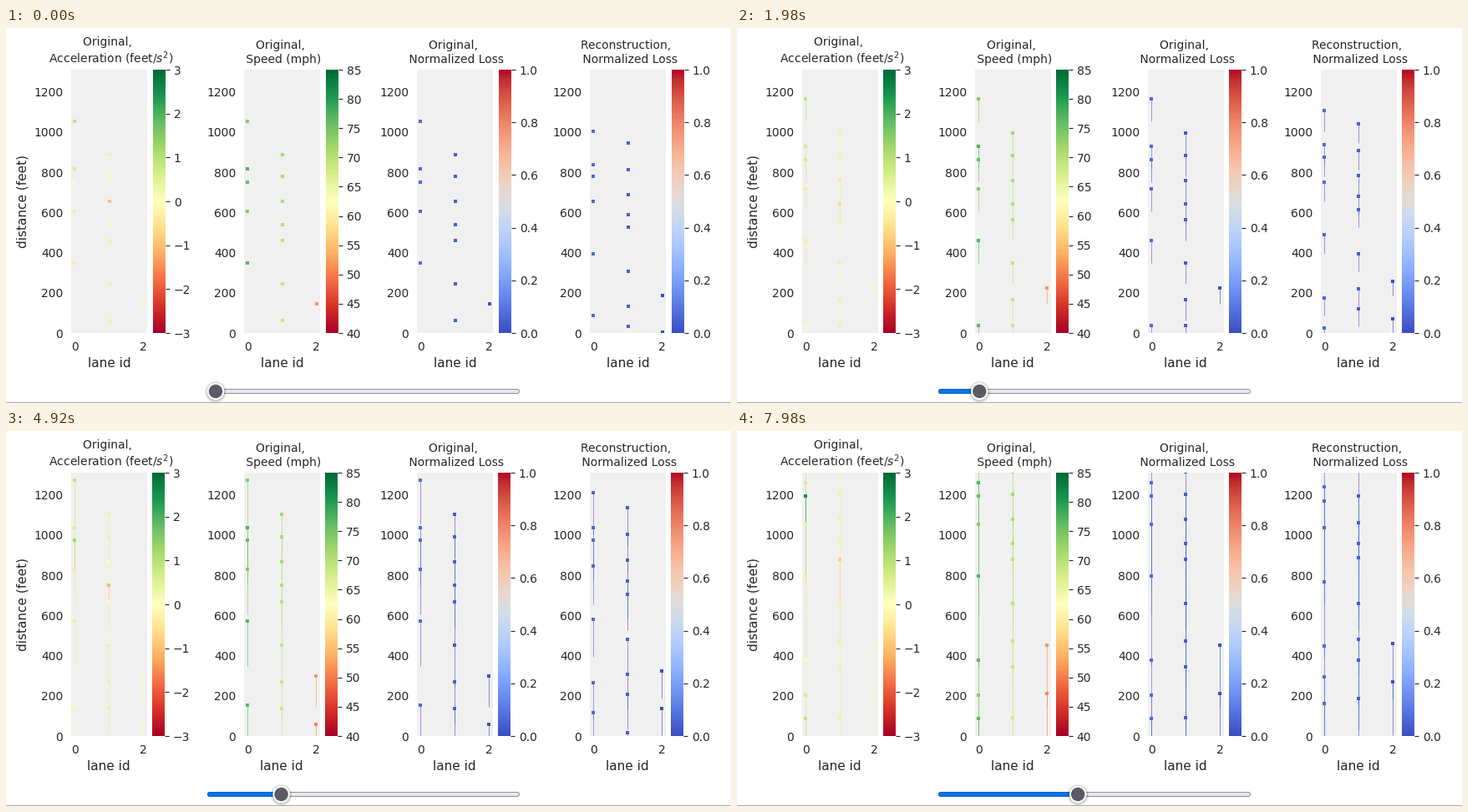
These frames come from a looping animation (868 px wide and 450 px high, 8000 ms). A matplotlib script:

```python
import numpy as np
import matplotlib.pyplot as plt
from matplotlib.animation import FuncAnimation
from matplotlib.cm import ScalarMappable
from matplotlib.collections import LineCollection
from matplotlib.colors import Normalize
from matplotlib.patches import Circle, FancyBboxPatch, Rectangle

W, H, DPI = 868, 450, 100
INTERVAL, FRAMES, HOLD = 320, 25, 6     # slider advances every HOLD frames
PX = 72 / DPI                           # one pixel in points
TOP, TALL, PITCH = 50, 316, 207         # panel top, height, spacing
INK = "#262626"

plt.rcParams.update({
    "font.family": "DejaVu Sans", "font.size": 10, "axes.titlesize": 10,
    "axes.labelsize": 11, "text.color": INK, "axes.labelcolor": INK,
    "xtick.color": INK, "ytick.color": INK})

# Per lane: start distances in feet, feet per step, change of pace per car
TRAFFIC = [
    ([1053, 817, 751, 606, 348, -73, -249, -365], 110.3, .4),
    ([888, 778, 655, 539, 460, 245, 62, -67, -315], 107, -.65),
    ([145, -95], 77, 0),
]
REBUILT = [
    ([1004, 838, 778, 655, 394, 85, -62, -185], 102.5, -2.3),
    ([944, 813, 689, 589, 525, 305, 133, 35, -149], 96.5, -1.6),
    ([187, 6], 68, -2.5),
]


def bump(x, width):
    return np.exp(-(x / width) ** 2)


def accel(lane, car, step):
    if lane == 0:       # one car speeds up among steady ones
        return .2 + .7 * np.cos(.9 * car) + .6 * step * bump(car - 2, .4)
    if lane == 1:       # a braking wave passes back through the lane
        return .35 - 1.4 * bump(car - 2.2 - .37 * step, .8)
    return .1 + 0 * car


def speed(lane, car, step):
    return (75.5 + 2 * np.sin(2 * car - 1), 71.5 - .45 * car, 52 - car)[lane]


def loss(lane, car, step):
    return .07 - .03 * lane + 0 * car


class Panel:
    def __init__(self, n, title, lanes, value, cmap, low, high, tick):
        self.left, self.lanes, self.value = 78 + PITCH * n, lanes, value
        self.map = ScalarMappable(Normalize(low, high), cmap)
        self.ax, self.bar = fig.add_axes([0, 0, 1, 1]), fig.add_axes([0, 0, .5, 1])

        ax = self.ax
        ax.set(xlim=(-.1, 2.1), ylim=(0, 1310), xticks=[0, 2],
               yticks=range(0, 1201, 200), xlabel="lane id", facecolor="#f0f0f0")
        ax.set_title(title)
        ax.tick_params(length=0, pad=7)
        ax.spines[:].set_visible(False)
        if n == 0:
            ax.set_ylabel("distance (feet)")

        bar = fig.colorbar(self.map, cax=self.bar,
                           ticks=np.arange(low, high + tick / 2, tick))
        bar.outline.set_visible(False)

        self.trails = ax.add_collection(
            LineCollection([], linewidths=PX, alpha=.6), autolim=False)
        self.cars = ax.scatter([], [], s=(4 * PX) ** 2, marker="s",
                               linewidths=0, zorder=3)

    def show(self, step):
        slim = 1 if step else 0
        place(self.ax, self.left, TOP, 91 - slim / 2, TALL)
        place(self.bar, self.left + 98 - slim, TOP, 15, TALL)

        spots, lines, values = [], [], []
        for lane, (starts, pace, change) in enumerate(self.lanes):
            car = np.arange(len(starts))
            ends = starts + (pace + change * car) * step
            spots += [(lane, y) for y in ends]
            lines += [[(lane - .012, a), (lane - .012, b)]
                      for a, b in zip(starts, ends)]
            values += list(self.value(lane, car, step))
        colors = self.map.to_rgba(np.array(values))
        self.cars.set_offsets(spots)
        self.cars.set_facecolor(colors)
        self.trails.set_segments(lines)
        self.trails.set_color(colors)


class Slider:
    X, Y = 251, 436

    def __init__(self):
        self.ax = ax = fig.add_axes([0, 0, 1, 1])
        ax.set(xlim=(0, W), ylim=(H, 0))
        ax.axis("off")
        self.pill(373, "#e9e9ed", "#8f8f9d")
        self.fill = self.pill(10, "#0a74e6", "#0a66cc")
        self.knob = [self.disc(r, "black", .07, .8) for r in (13, 12, 11)]
        self.knob += [self.disc(10.2, "white"), self.disc(8.2, "#5b5b66")]
        ax.add_patch(Rectangle((0, 449), W, 1, fc="#a8a8a8", ec="none"))

    def pill(self, w, fc, ec):
        style = "round,pad=0,rounding_size=2.5"
        return self.ax.add_patch(FancyBboxPatch(
            (241.5, self.Y - 2.5), w, 5, boxstyle=style, fc=fc, ec=ec, lw=PX))

    def disc(self, r, color, alpha=1, drop=0):
        return self.ax.add_patch(Circle((self.X, self.Y + drop), r, fc=color,
                                        ec="none", alpha=alpha, zorder=3))

    def show(self, step):
        x = self.X + 39.3 * step
        self.fill.set_width(x - 241.5)
        for part in self.knob:
            part.center = x, part.center[1]


def place(ax, x, y, w, h):
    ax.set_position([x / W, 1 - (y + h) / H, w / W, h / H])


fig = plt.figure(figsize=(W / DPI, H / DPI), dpi=DPI, facecolor="white")
parts = [
    Panel(0, "Original, \n Acceleration (feet/$s^2$)", TRAFFIC, accel,
          "RdYlGn", -3, 3, 1),
    Panel(1, "Original, \n Speed (mph)", TRAFFIC, speed, "RdYlGn", 40, 85, 5),
    Panel(2, "Original, \n Normalized Loss", TRAFFIC, loss,
          "coolwarm", 0, 1, .2),
    Panel(3, "Reconstruction, \n Normalized Loss", REBUILT, loss,
          "coolwarm", 0, 1, .2),
    Slider(),
]


def draw(i):
    for part in parts:
        part.show(i // HOLD)
    return []


anim = FuncAnimation(fig, draw, frames=FRAMES, interval=INTERVAL,
                     init_func=lambda: draw(0), repeat=True, repeat_delay=0)
plt.show()
```
